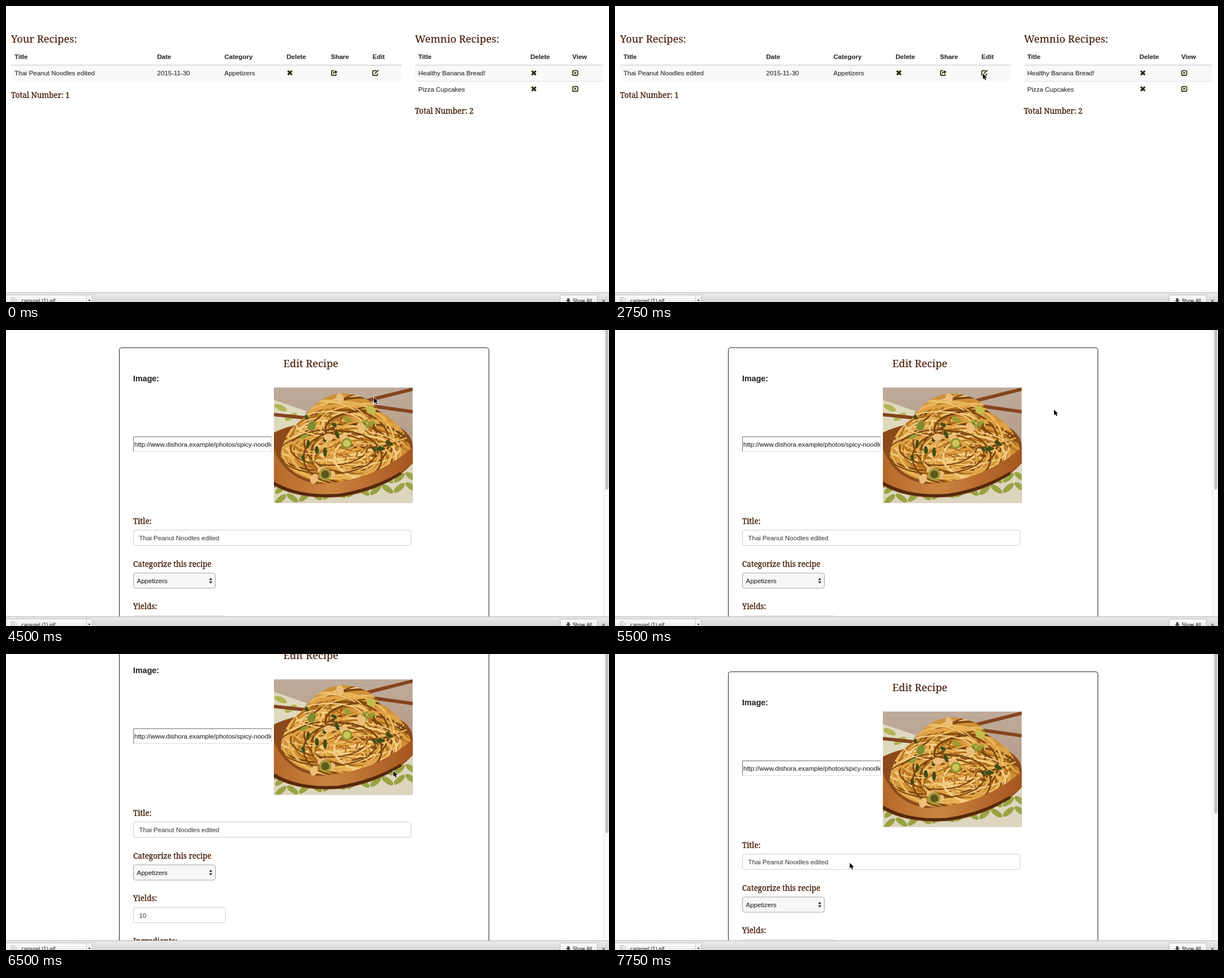
Write an HTML page that moves like this. It is 1067x525 px and loops after 8000 ms.

```html
<!DOCTYPE html>
<html lang="en">
<head>
<meta charset="utf-8">
<title>Recipe editor</title>
<style>
  html, body { margin: 0; width: 100%; height: 100%; overflow: hidden; background: #fff; }
  svg { display: block; width: 1067px; height: 525px; }
  text { font: 11.5px "Liberation Sans", Arial, sans-serif; fill: #2b2b2b; stroke: #2b2b2b; stroke-width: .12px; white-space: pre; }
  .th { font-weight: bold; }
  .label { font-size: 14.3px; font-weight: bold; }
  .h1, .h2 { font-family: "Noto Serif", Georgia, serif; fill: #421a02; stroke: #421a02; }
  .h1 { font-size: 18.3px; }
  .h2 { font-size: 13.5px; stroke-width: .3px; }
  .field { fill: #484848; stroke: #484848; }
  .bar { font: 8px "DejaVu Sans", sans-serif; fill: #222; }
  .box { fill: #fff; stroke: #ccc; }
  .icon { fill: none; stroke: #2d2c08; stroke-width: 1.7; }
</style>
</head>
<body>
<svg id="stage" viewBox="0 0 1067 525">
  <defs>
    <linearGradient id="barFill" x2="0" y2="1"><stop stop-color="#ececec"/><stop offset="1" stop-color="#d6d6d6"/></linearGradient>
    <linearGradient id="button" x2="0" y2="1"><stop stop-color="#fbfbfb"/><stop offset="1" stop-color="#e4e4e4"/></linearGradient>
    <linearGradient id="wood" x2="0" y2="1"><stop stop-color="#bfab9a"/><stop offset="1" stop-color="#a98d75"/></linearGradient>
    <linearGradient id="bowl" x2="1" y2="0"><stop stop-color="#b56a2c"/><stop offset=".4" stop-color="#cb8440"/><stop offset="1" stop-color="#a5551f"/></linearGradient>
    <clipPath id="frame"><path d="M0 0H245.5V204.5H0Z"/></clipPath>
    <clipPath id="mound"><path id="moundShape" d="M12 125Q14 80 52 55Q80 12 122 10Q172 14 186 42Q232 65 243 112Q210 160 130 172Q40 172 12 125Z"/></clipPath>
    <clipPath id="urlClip"><path d="M227 190H469V215H227Z"/></clipPath>
    <path id="cross" d="M-3.6 -3.6L3.6 3.6M3.6 -3.6L-3.6 3.6" fill="none" stroke="#2d2c08" stroke-width="3.1"/>
    <path id="share" class="icon" d="M0 -4H-2.5Q-4.5 -4 -4.5 -2V2.5Q-4.5 4.5 -2.5 4.5H2Q4 4.5 4 2.5V2M-1.5 1.8Q-1.5 -1.6 2.5 -1.6"/>
    <path id="shareTip" d="M1.8 -5.2L6 -1.6L1.8 2Z" fill="#2d2c08"/>
    <path id="edit" class="icon" d="M1.5 -4H-3Q-5 -4 -5 -2V2.5Q-5 4.5 -3 4.5H1.5Q3.5 4.5 3.5 2.5V1M-1.5 1.5L5 -5"/>
    <g id="view"><rect class="icon" x="-4.5" y="-4.2" width="9" height="8.6" rx="2"/><path d="M-1.5 -2.4L2.4 .1L-1.5 2.6Z" fill="#2d2c08"/></g>
  </defs>
  <g id="list"></g>
  <g id="editor">
    <g id="form"></g>
    <path d="M1058 0H1067V508H1058Z" fill="#fafafa"/>
    <path d="M1057.5 0V508" stroke="#e7e7e7"/>
    <rect id="thumb" x="1060.5" y="-6" width="5.5" rx="2.7" fill="#c1c1c1"/>
  </g>
  <g id="downloads"></g>
  <path id="cursor" d="M0 0V10L2.3 7.8L4 11.6L5.7 10.9L4.1 7.2H7.2Z" stroke="#fff" stroke-width="1.4" paint-order="stroke"/>
</svg>
<script>
const $ = id => document.getElementById(id);
const text = (x, y, str, cls = "", extra = "") => `<text x="${x}" y="${y}" class="${cls}" ${extra}>${str}</text>`;
const row = (y, cls, cells) => cells.map(([x, str]) => text(x, y, str, cls)).join("");
const use = (id, x, y) => `<use href="#${id}" x="${x}" y="${y}"/>`;
const line = (d, color, width = 1) => `<path d="${d}" fill="none" stroke="${color}" stroke-width="${width}"/>`;
const fill = (d, color) => `<path d="${d}" fill="${color}"/>`;
const box = (x, y, w, h) => `<rect class="box" x="${x}" y="${y}" width="${w}" height="${h}" rx="3"/>`;

let seed = 7;
const rand = (min, max) => {
  seed = (seed * 16807) % 2147483647;
  return min + (max - min) * seed / 2147483647;
};
const repeat = (n, make) => Array.from({ length: n }, (_, i) => make(i)).join("");

function photo() {
  const ellipse = (x, y, rx, ry, turn, color) =>
    `<ellipse rx="${rx}" ry="${ry}" fill="${color}" transform="translate(${x} ${y}) rotate(${turn})"/>`;
  const strands = repeat(80, i => {
    const r = rand(25, 95);
    return `<ellipse cx="${rand(75, 175)}" cy="${rand(60, 140)}" rx="${r}" ry="${r * rand(.35, .8)}" fill="none"
      stroke="${["#eab75c", "#b5721f", "#e0a244", "#f3cd84", "#7c4711"][i % 5]}" stroke-width="${rand(2, 3.8)}"/>`;
  });
  const herbs = repeat(20, i => ellipse(rand(50, 210), rand(35, 125), rand(4, 9), rand(2, 4), rand(0, 180), i % 3 ? "#3f4c17" : "#92a035"));
  const nuts = [[97, 88], [125, 90], [117, 19], [71, 162], [100, 155], [86, 147], [155, 70]]
    .map(([x, y], i) => ellipse(x, y, 9, 6.5, i * 37, "#ecbd7a")).join("");
  const leaves = repeat(24, i => ellipse(12 + i % 12 * 21, 198 - i % 12 * 2 + (i > 11 ? -18 : 0), 12, 5, i % 2 ? 35 : -40, "#98a343"));
  return `<g transform="translate(474 102)" clip-path="url(#frame)">
    ${fill("M0 0H246V205H0Z", "url(#wood)")}
    ${fill("M0 22L58 42L40 75L0 82Z", "#dfd9bd")}
    ${ellipse(12, 36, 12, 5, 25, "#b3b556")}${ellipse(30, 52, 12, 5, -30, "#b3b556")}
    ${fill("M0 178L246 128V205H0Z", "#ddd5be")}${leaves}
    ${line("M130 32L246 3M175 33L246 43M0 48L75 56", "#84441f", 6)}
    ${fill("M0 80Q25 68 60 62H205Q246 78 246 106V134Q205 180 120 194Q45 200 0 174Z", "#8c4a1b")}
    <use href="#moundShape" fill="#cf9137"/>
    <g clip-path="url(#mound)">${strands}${herbs}</g>
    ${fill("M0 108Q18 160 75 171Q175 168 246 106V134Q200 174 115 189Q45 194 0 166Z", "url(#bowl)")}
    ${line("M0 170Q45 196 115 191Q175 182 225 152", "#53290d", 5)}
    ${nuts}
    <circle cx="129" cy="99" r="8" fill="#d1c45b" stroke="#8a9430" stroke-width="3"/>
    <circle cx="91" cy="154" r="9" fill="#5c571c" stroke="#a79a3a" stroke-width="4"/>
    ${ellipse(172, 40, 9, 7, 30, "#c3bd4c")}${ellipse(67, 68, 7, 9, 20, "#7f8c30")}
  </g>`;
}

$("list").innerHTML =
  text(9, 65, "Your Recipes:", "h1") + text(723.5, 65, "Wemnio Recipes:", "h1") +
  fill("M9.5 105H700V133H9.5ZM724 105H1057V133H724Z", "#f9f9f9") +
  line("M9.5 104.7H700M724 104.7H1057", "#d6d6d6", 1.5) + line("M724 133.5H1057", "#ddd") +
  row(94.3, "th", [[15, "Title"], [267.5, "Date"], [386.5, "Category"], [496.5, "Delete"], [575, "Share"], [648.5, "Edit"],
    [729.5, "Title"], [928, "Delete"], [1002, "View"]]) +
  row(123.3, "", [[15, "Thai Peanut Noodles edited"], [267.5, "2015-11-30"], [386.5, "Appetizers"], [729.5, "Healthy Banana Bread!"]]) +
  text(729.5, 151.6, "Pizza Cupcakes") +
  text(9, 163, "Total Number: 1", "h2") + text(723.5, 191, "Total Number: 2", "h2") +
  use("cross", 502.3, 118.5) + use("share", 580.5, 118.7) + use("shareTip", 580.5, 118.7) + use("edit", 654, 118.7) +
  [118.7, 147].map(y => use("cross", 934, y) + use("view", 1007.2, y)).join("");

$("form").innerHTML =
  fill("M0 -20H1057.5V-1.5H0Z", "#ff9696") +
  `<rect x="200.5" y="31.5" width="654" height="900" rx="4" fill="#fff" stroke="#222"/>` +
  text(539.5, 65.5, "Edit Recipe", "h1", 'text-anchor="middle"') +
  text(225, 91, "Image:", "label") +
  line("M469.5 190V215.5H226", "#ddd") + line("M225.5 215.5V189.5H470", "#707070") +
  text(227, 207, "http://www.dishora.example/photos/spicy-noodle-plate", "", 'clip-path="url(#urlClip)"') +
  photo() +
  text(225, 343.5, "Title:", "h2") + box(225.5, 355, 491, 27) + text(235.5, 373, "Thai Peanut Noodles edited", "field") +
  text(225, 419.5, "Categorize this recipe", "h2") +
  `<rect x="225.5" y="431" width="145" height="27" rx="4" fill="#f7f7f7" stroke="#a3a3a3"/>` +
  text(231.5, 449, "Appetizers") + fill("M359.5 443.4H365L362.2 439.3ZM359.5 445.8H365L362.2 449.9Z", "#333") +
  text(225, 495.2, "Yields:", "h2") + box(225.5, 506.7, 163, 27) + text(235.5, 524.5, "10", "field") +
  text(225, 570.5, "Ingredients:", "h2");

$("downloads").innerHTML =
  fill("M0 508H1067V525H0Z", "url(#barFill)") + line("M0 508.5H1067", "#b5b5b5") +
  `<rect x="-5" y="512.5" width="157.5" height="22" rx="2" fill="url(#button)" stroke="#bbb"/>` +
  `<rect x="980.5" y="512.5" width="66" height="22" rx="3" fill="url(#button)" stroke="#b5b5b5"/>` +
  line("M142.5 513V525", "#c4c4c4") + fill("M145.3 521H149.7L147.5 523.8Z", "#333") +
  `<path d="M9.5 526V517.5H15L18 520.5V526" fill="#f6f6f6" stroke="#aaa"/>` + line("M11 521H15M11 523.5H16", "#aaa") +
  text(27, 526.3, "carousel (1).gif", "bar") + text(1003, 526.3, "Show All", "bar") +
  fill("M993 518.5H997V522H999.5L995 526L990.5 522H993Z", "#444") +
  line("M1055 521L1059.5 525.5M1059.5 521L1055 525.5", "#666", 1.3);

// time, pointer x, pointer y, scroll offset
const keys = [
  [500, 540, 150, 0], [750, 552, 138, 0], [1250, 640, 92, 0], [1500, 655, 104, 0],
  [1750, 630.5, 112.7, 0], [2250, 668, 120, 0], [2750, 651, 120, 0], [4750, 651, 120, 0],
  [5500, 776.8, 141.2, 0], [6000, 685.5, 207.5, 40], [6250, 685.5, 207.5, 70], [6500, 685.5, 207.5, 57],
  [7000, 685.5, 207.5, -4.5], [7250, 600, 262, -4.5], [7500, 508, 316, 0], [7750, 415.5, 370.5, 0], [8000, 415.5, 370.5, 0]
];
const LOOP = 8000, STEP = 250, OPEN = 4500;

function pose(t) {
  const i = Math.max(1, keys.findIndex(k => k[0] > t));
  const a = keys[i - 1], b = keys[i], p = (t - a[0]) / (b[0] - a[0]);
  return a.map((v, n) => v + (b[n] - v) * p);
}

const show = (id, on) => $(id).setAttribute("visibility", on ? "visible" : "hidden");

function draw(now) {
  const t = Math.floor(now % LOOP / STEP) * STEP;
  const [, x, y, scroll] = pose(Math.max(t, keys[0][0]));
  show("list", t < OPEN);
  show("editor", t >= OPEN);
  show("cursor", t >= keys[0][0]);
  $("cursor").setAttribute("transform", `translate(${x} ${y})`);
  $("form").setAttribute("transform", `translate(0 ${-scroll})`);
  $("thumb").setAttribute("height", 289 + scroll * .61);
  requestAnimationFrame(() => draw(performance.now()));
}
draw(0);
</script>
</body>
</html>
```
